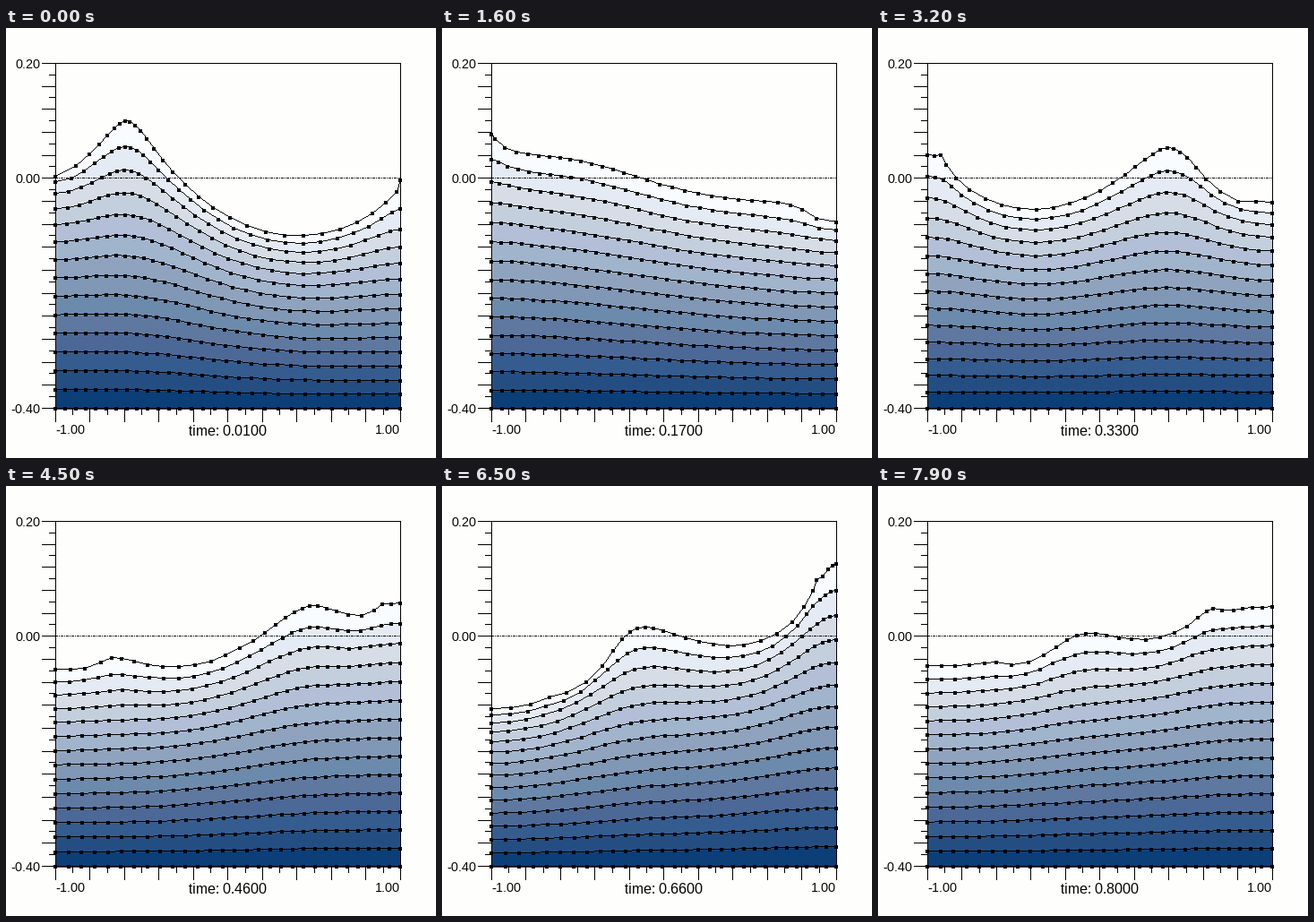
These frames come from a looping animation (480 px wide and 480 px high, 8 s). A matplotlib script:

```python
import numpy as np
import matplotlib.pyplot as plt
from matplotlib.animation import FuncAnimation
from matplotlib.patches import Polygon

plt.rcParams["text.hinting"] = "native"
plt.rcParams["text.hinting_factor"] = 1

# Linear standing waves in a closed tank, drawn as a mesh of drifting particles.
FRAMES, DT = 80, 0.01
G, DEPTH, AMP = 9.81, 0.4, 0.1
COLS, ROWS = 30, 15
LEFT, RIGHT, TOP, BOTTOM = 55, 440, 40, 425
SIDE = RIGHT - LEFT
PT = 0.75                                    # points per pixel at 96 dpi
SHADES = ("f8fcff e4ebf5 d6dde6 c4cfdd b2bfd7 a0b4cc 90a3be "
          "8097b5 6c8aac 5e78a0 4c6896 345c8e 244e82 0c3e78").split()

# Cosine series of the starting surface AMP * sin(2 pi x), 0 <= x <= 1
n = np.arange(1, 48, 2)
k = n * np.pi
amp = AMP * 8 / np.pi / (4 - n ** 2)
omega = np.sqrt(G * k * np.tanh(k * DEPTH))

x0 = np.linspace(0, 1, COLS)
y0 = np.linspace(0, -DEPTH, ROWS)
lift = y0[:, None] + DEPTH
up = np.sinh(k * lift) / np.sinh(k * DEPTH)
across = np.cosh(k * lift) / np.sinh(k * DEPTH)
cos_x, sin_x = np.cos(np.outer(k, x0)), np.sin(np.outer(k, x0))


def snap(v):
    return np.ceil(np.asarray(v) - 0.5)


def px(x):
    return snap(LEFT + SIDE * x)


def py(y):
    return snap(TOP + SIDE * (0.2 - y) / 0.6)


def mesh(t):
    a = amp * np.cos(omega * t)
    return px(x0 - (across * a) @ sin_x), py(y0[:, None] + (up * a) @ cos_x)


def trace(xs, ys):
    """Pixels of a one-pixel polyline without smoothing."""
    parts = []
    for xa, ya, xb, yb in zip(xs[:-1], ys[:-1], xs[1:], ys[1:]):
        steps = int(max(abs(xb - xa), abs(yb - ya)))
        s = np.linspace(0, 1, steps + 1)
        parts.append(snap([xa + (xb - xa) * s, ya + (yb - ya) * s]))
    return np.hstack(parts)


fig = plt.figure(figsize=(5, 5), dpi=96, facecolor="#fefefd")
ax = fig.add_axes([0, 0, 1, 1])
ax.set(xlim=(0, 480), ylim=(480, 0))
ax.axis("off")


def ink(x, y, z, marker=",", **kw):
    return ax.plot(x, y, marker, color="black", mew=0, zorder=z, **kw)[0]


def line(xs, ys):
    return ink(*trace(xs, ys), 4)


def label(x, y, text, size=14):
    return ax.text(x, y, text, fontsize=size * PT, family="Liberation Sans",
                   ha="left", va="baseline", zorder=9)


# Each band reaches down to the floor and is covered by the next one
bands = [ax.add_patch(Polygon([(0, 0), (1, 0), (1, 1)], facecolor="#" + shade,
                              edgecolor="none", lw=0, zorder=1 + j / 100))
         for j, shade in enumerate(SHADES)]
rows = [ink([], [], 3) for _ in range(ROWS)]
dots = ink([], [], 5, "s", ms=4 * PT)

# Box, zero line and ticks
line([LEFT, RIGHT, RIGHT, LEFT, LEFT], [TOP, TOP, BOTTOM, BOTTOM, TOP])
dash = np.arange(LEFT, RIGHT)
dash = dash[np.isin((dash - LEFT) % 6, (0, 1, 2, 4))]
ink(dash, np.full(len(dash), py(0)), 4)
for i in range(31):
    y = snap(TOP + SIDE * i / 30)
    line([LEFT - (7 if i % 2 else 15), LEFT], [y, y])
for i in range(21):
    x = px(i / 20)
    line([x, x], [BOTTOM, BOTTOM + (7 if i % 2 else 15)])

label(10, py(0.2) + 5, "0.20")
label(10, py(0) + 5, "0.00")
label(5, py(-0.4) + 5, "-0.40")
label(55, 453, "-1.00")
label(412, 453, "1.00")
clock = label(204, 455, "", 16)


def update(i):
    now = (i + 1) * DT
    xs, ys = mesh(now)
    for row, x, y in zip(rows, xs, ys):
        row.set_data(*trace(x, y))
    for band, x, y in zip(bands, xs, ys):
        edge = np.c_[np.r_[x, RIGHT, LEFT], np.r_[y, BOTTOM, BOTTOM]]
        band.set_xy(edge + 0.5)
    dots.set_data(xs.ravel(), ys.ravel())
    clock.set_text(f"time: {now:.4f}")
    return rows + bands + [dots, clock]


anim = FuncAnimation(fig, update, frames=FRAMES, interval=100, repeat=True,
                     repeat_delay=0, blit=False)
plt.show()
```
